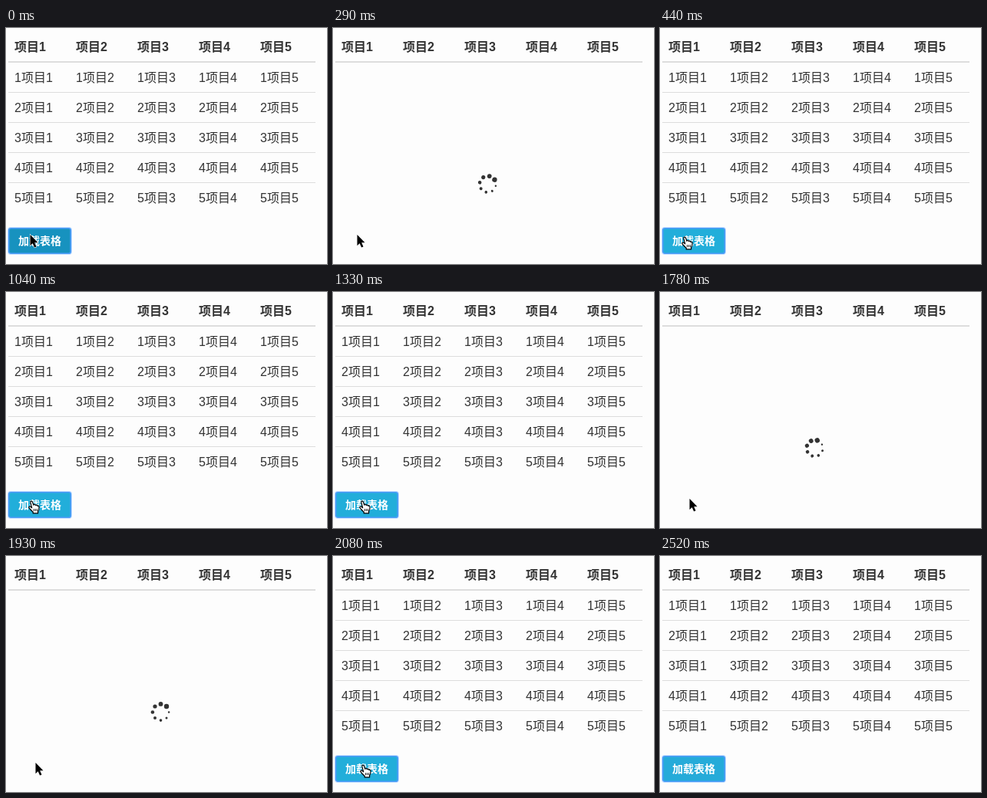
Animation, 418 px wide and 306 px high, one loop 2.96 s. Source, as an HTML page:

```html
<!DOCTYPE html>
<html lang="zh-CN">
<head>
<meta charset="utf-8">
<title>加载表格</title>
<style>
html, body { margin: 0; width: 100%; height: 100%; overflow: hidden; background: #fdfdfd; }
svg { display: block; }
text { font: 16px "Liberation Sans", "Noto Sans CJK SC", "Noto Sans CJK", sans-serif; fill: #333; }
.head { font-weight: bold; }
.label { font-size: 14px; font-weight: bold; fill: #fff; }
</style>
</head>
<body>
<svg id="stage" width="418" height="306" viewBox="0 0 418 306">
  <g id="head"></g>
  <rect x="3" y="43" width="400" height="2" fill="#ddd"/>
  <g id="rows"></g>
  <g id="button">
    <rect x="2" y="258" width="84" height="36" rx="4" fill="#8fc4ff" opacity=".5"/>
    <rect id="face" x="3.75" y="259.75" width="80.5" height="32.5" rx="2.5" stroke="#4a9cf8" stroke-width="1.7"/>
    <text class="label" x="16" y="281">加载表格</text>
  </g>
  <g id="spinner" fill="#333"></g>
  <path id="arrow" d="M0 0V14.2L3.2 11.2L5.6 16.6L8 15.6L5.7 10.3H10Z"
    fill="#000" stroke="#fff" stroke-width="1.1" paint-order="stroke"/>
  <g id="hand" fill="#fff" stroke="#000" stroke-width="1.2" stroke-linejoin="round">
    <path d="M5.7 9.8L3.9 3.2C3.3 1 5.7 .2 6.5 2.2L7.8 6.2C8.3 5 10.1 5.1 10.4 6.6C11.2 5.7 12.6 6.1 12.8 7.5C13.8 6.8 15 7.4 15 8.8C15.2 11.6 14.6 13.2 13.6 14.7V16.9H7.2V15.3C5.2 13.6 3.9 11.9 2.3 10.2C.9 8.6 2.6 7.4 4.1 8.5Z"/>
    <path d="M8.4 11.2V14.2M10.4 11.2V14.2M12.4 11.2V14.2" stroke-width=".9"/>
  </g>
</svg>
<script>
const LOOP = 2960;
const NORMAL = '#25abd9', HOVER = '#22aeda', ACTIVE = '#1792bf';

// start, button colour (null while loading), cursor, cursor x, spinner angle
const STEPS = [
  [0, ACTIVE, 'arrow', 31.5],
  [150, null, 'arrow', 31.5, -14],
  [290, null, 'arrow', 31.5, 12],
  [440, HOVER, 'hand', 27],
  [1040, HOVER, 'hand', 28],
  [1190, HOVER, 'hand', 29],
  [1330, HOVER, 'hand', 33],
  [1480, HOVER, 'hand', 34],
  [1630, ACTIVE, 'hand', 34],
  [1780, null, 'arrow', 38.5, -27],
  [1930, null, 'arrow', 38.5, 0],
  [2080, HOVER, 'hand', 34],
  [2380, HOVER, 'hand', 60],
  [2520, NORMAL, null, 0]
];

const $ = id => document.getElementById(id);

function add(parent, tag, attrs, text = '') {
  const el = document.createElementNS('http://www.w3.org/2000/svg', tag);
  for (const key in attrs) el.setAttribute(key, attrs[key]);
  el.textContent = text;
  $(parent).append(el);
}

for (let col = 1; col <= 5; col++) {
  const x = 80 * col - 69;
  add('head', 'text', { class: 'head', x, y: 30 }, `项目${col}`);
  for (let row = 1; row <= 5; row++) {
    add('rows', 'text', { x, y: 31 + 39 * row }, `${row}项目${col}`);
  }
}
for (let row = 1; row < 5; row++) {
  add('rows', 'rect', { x: 3, y: 44 + 39 * row, width: 400, height: 1, fill: '#ddd' });
}

[1.2, 1.5, 1.8, 2, 2.3, 2.6, 2.9, 3.2].forEach((r, i) => {
  const a = i * Math.PI / 4;
  add('spinner', 'circle', { cx: 10.6 * Math.cos(a), cy: 10.6 * Math.sin(a), r });
});

const show = (id, on) => $(id).setAttribute('visibility', on ? 'visible' : 'hidden');
const move = (id, value) => $(id).setAttribute('transform', value);

function draw() {
  const t = performance.now() % LOOP;
  const [, colour, cursor, x, angle = 0] = STEPS.findLast(step => step[0] <= t);
  show('rows', colour);
  show('button', colour);
  show('spinner', !colour);
  show('arrow', cursor === 'arrow');
  show('hand', cursor === 'hand');
  if (colour) $('face').setAttribute('fill', colour);
  if (cursor) move(cursor, `translate(${x} ${cursor === 'arrow' ? 268 : 270})`);
  move('spinner', `translate(201.5 202.5) rotate(${angle})`);
  requestAnimationFrame(draw);
}
draw();
</script>
</body>
</html>
```
